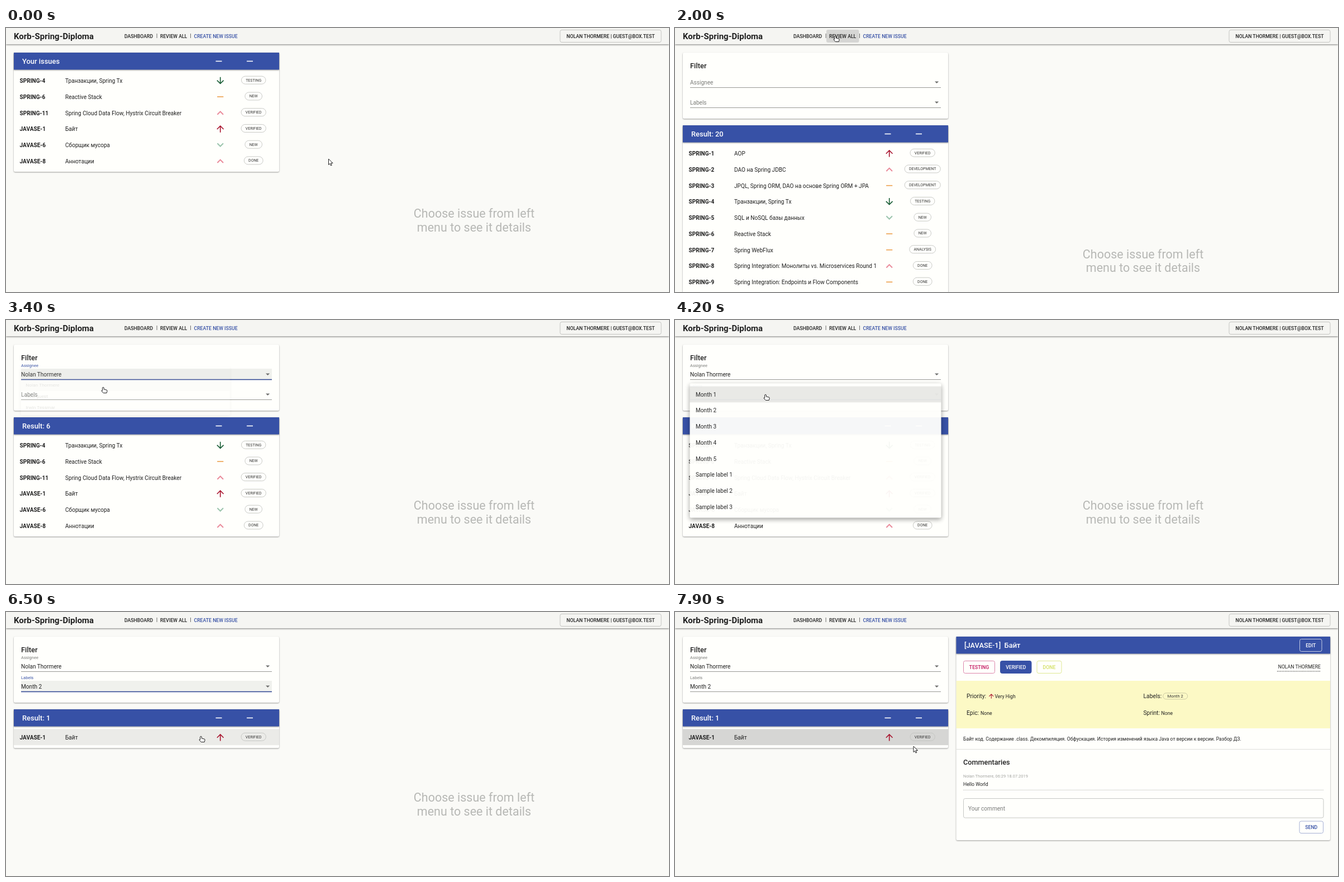
An HTML page that plays this animation: 1187x472 px, repeating every 8000 ms.

```html
<!DOCTYPE html>
<html lang="en">
<head>
<meta charset="utf-8">
<title>Issue tracker</title>
<style>
  html, body { margin: 0; width: 100%; height: 100%; overflow: hidden; background: #fafaf7; }
  svg { display: block; width: 1187px; height: 472px; font-family: Roboto, "Liberation Sans", sans-serif; white-space: pre; }
  .card { filter: drop-shadow(0 1px 1.3px rgba(0,0,0,.38)); }
  .menu { filter: drop-shadow(0 3px 4px rgba(0,0,0,.4)); }
</style>
</head>
<body>
<svg id="stage" viewBox="0 0 1187 472" xmlns="http://www.w3.org/2000/svg"></svg>
<script>
const LOOP = 8000;
const BLUE = '#3751a6', INK = '#212121', GRAY = '#7b7c7a', PAPER = '#fffffc', BG = '#fafaf7';
const USER = 'Nolan Thormere';
const ROW = 28.75, BODY = 10.1, SMALL = 8.7;
const stage = document.getElementById('stage');
const pen = document.createElement('canvas').getContext('2d');

// id, title, priority, status, belongs to the current user
const ISSUES = [
  ['SPRING-1', 'AOP', 'top', 'VERIFIED'],
  ['SPRING-2', 'DAO на Spring JDBC', 'high', 'DEVELOPMENT'],
  ['SPRING-3', 'JPQL, Spring ORM, DAO на основе Spring ORM + JPA', 'mid', 'DEVELOPMENT'],
  ['SPRING-4', 'Транзакции, Spring Tx', 'lowest', 'TESTING', 1],
  ['SPRING-5', 'SQL и NoSQL базы данных', 'low', 'NEW'],
  ['SPRING-6', 'Reactive Stack', 'mid', 'NEW', 1],
  ['SPRING-7', 'Spring WebFlux', 'mid', 'ANALYSIS'],
  ['SPRING-8', 'Spring Integration: Монолиты vs. Microservices Round 1', 'high', 'DONE'],
  ['SPRING-9', 'Spring Integration: Endpoints и Flow Components', 'mid', 'DONE'],
  ['SPRING-11', 'Spring Cloud Data Flow, Hystrix Circuit Breaker', 'high', 'VERIFIED', 1],
  ['JAVASE-1', 'Байт', 'top', 'VERIFIED', 1],
  ['JAVASE-6', 'Сборщик мусора', 'low', 'NEW', 1],
  ['JAVASE-8', 'Аннотации', 'high', 'DONE', 1]
];
const MINE = ISSUES.filter(issue => issue[4]);
const FOUND = MINE.filter(issue => issue[0] === 'JAVASE-1');

const MENUS = [
  { y: 97, items: ['', USER, 'New guest', 'Irwin Tessmar'], open: 2550, close: 3235, span: 266, picked: 0, pick: LOOP },
  { y: 133, items: [1, 2, 3, 4, 5].map(n => 'Month ' + n).concat([1, 2, 3].map(n => 'Sample label ' + n)),
    open: 3970, close: 5715, span: 311, picked: 1, pick: 4800 }
];

// time, x, y of the pointer's hot spot
const POINTER = [
  [0, 577.5, 234], [400, 577.5, 234], [900, 260, 42], [1050, 260, 42], [1500, 287, 14], [2050, 287, 14],
  [2500, 170, 97], [2950, 170, 97], [3180, 174, 120], [3420, 174, 120], [3800, 162, 133], [4220, 162, 133],
  [4500, 162, 157], [5250, 162, 157], [5600, 538, 197], [6050, 538, 197], [6480, 349, 222], [6580, 349, 222],
  [6800, 312, 222], [7650, 312, 222], [7900, 427, 240], [LOOP, 427, 240]
];

const clamp = v => Math.max(0, Math.min(1, v));
const mix = (a, b, p) => a + (b - a) * p;
const smooth = p => p * p * (3 - 2 * p);

// cubic-bezier(.4, 0, .2, 1)
function standardEase(p) {
  p = clamp(p);
  let lo = 0, hi = 1, s = p;
  for (let i = 0; i < 18; i++) {
    s = (lo + hi) / 2;
    const x = 3 * s * (1 - s) * (.4 * (1 - s) + .2 * s) + s ** 3;
    if (x < p) lo = s; else hi = s;
  }
  return 3 * (1 - s) * s * s + s ** 3;
}

function text(x, middle, str, size = BODY, fill = INK, weight = 400, anchor = 'start') {
  return `<text x="${x}" y="${middle + size * .355}" font-size="${size}" fill="${fill}" font-weight="${weight}" text-anchor="${anchor}">${str}</text>`;
}
function rect(x, y, w, h, fill, extra = '') {
  return `<rect x="${x}" y="${y}" width="${w}" height="${h}" fill="${fill}" ${extra}/>`;
}
const card = (x, y, w, h) => rect(x, y, w, h, PAPER, 'rx="2.5" class="card"');
const line = (x1, x2, y, color, width = 1, dash = '') =>
  `<path d="M${x1} ${y}H${x2}" stroke="${color}" stroke-width="${width}" stroke-dasharray="${dash}"/>`;

function button(x, y, w, h, label, color, border = color, fill = 'none') {
  return rect(x + .5, y + .5, w - 1, h - 1, fill, `rx="3" stroke="${border}"`) +
    text(x + w / 2, y + h / 2, label, SMALL, color, 500, 'middle');
}
function chip(cx, cy, label, size = 6.95, h = 14, border = '#c3c4c1') {
  pen.font = `${size}px Roboto, "Liberation Sans", sans-serif`;
  const w = pen.measureText(label).width + 15.6;
  return rect(cx - w / 2, cy - h / 2, w, h, 'none', `rx="${h / 2}" stroke="${border}" stroke-width=".9"`) +
    text(cx, cy, label, size, '#333', 400, 'middle');
}

const ARROW = 'M-6.4 0l1.13 1.13L-.8-3.34V6.4H.8V-3.34l4.47 4.47L6.4 0 0-6.4z';
const CHEVRON = 'M0-3.7l-6 6 1.41 1.41L0-.87l4.59 4.58L6 2.3z';
const DASH = 'M-5.6-.8H5.6V.8H-5.6z';
const PRIORITY = {
  top: [ARROW, '#a8122c', 1], high: [CHEVRON, '#ea8b9a', 1], mid: [DASH, '#eda04c', 1],
  low: [CHEVRON, '#9cc5ad', -1], lowest: [ARROW, '#175c33', -1]
};
function icon(x, y, kind, scale = 1) {
  const [d, fill, flip] = PRIORITY[kind];
  return `<path d="${d}" fill="${fill}" transform="translate(${x} ${y}) scale(${scale} ${scale * flip})"/>`;
}

function pointerAt(t) {
  const i = POINTER.findIndex(key => key[0] > t);
  const [t0, x0, y0] = POINTER[i - 1], [t1, x1, y1] = POINTER[i];
  const p = smooth((t - t0) / (t1 - t0));
  return { x: mix(x0, x1, p), y: mix(y0, y1, p) };
}
function drawPointer({ x, y }, hand) {
  const d = hand
    ? 'M-1.3 1Q0-.9 1.3 1V4L6 5Q7.4 5.4 7.1 7L6.2 10.5H.3L-3 6.8Q-3.2 5.3-1.3 6.2Z'
    : 'M0 0V10.5L2.4 8.3 4 12 5.8 11.2 4.2 7.6H7.6Z';
  return `<path d="${d}" transform="translate(${x} ${y})" fill="#fff" stroke="#222" stroke-linejoin="round"/>`;
}
const inside = (p, x, y, w, h) => p.x >= x && p.x < x + w && p.y >= y && p.y < y + h;

function topBar(t, pointer) {
  let out = rect(0, 0, 1187, 29, '#f5f5f2', 'style="filter:drop-shadow(0 1px 1.5px rgba(0,0,0,.5))"');
  if (inside(pointer, 271, 3, 58, 23))
    out += rect(271, 3, 58.5, 23, '#000', `rx="3" opacity="${mix(.07, .125, clamp((t - 1700) / 200))}"`);
  return out + text(14, 14.5, 'Korb-Spring-Diploma', 15, INK, 700) +
    text(212, 14.5, 'DASHBOARD', SMALL, INK, 500) + text(269, 14, '|', SMALL) +
    text(276, 14.5, 'REVIEW ALL', SMALL, INK, 500) + text(329.5, 14, '|', SMALL) +
    text(336.5, 14.5, 'CREATE NEW ISSUE', SMALL, BLUE, 500) +
    button(991.5, 3, 182, 23, USER.toUpperCase() + ' | GUEST@BOX.TEST', INK, '#c4c5c2');
}

function field(y, label, value, focused, shrink) {
  let out = focused ? rect(27, y - 10, 449, 19.5, '#f0f1ed') : '';
  out += line(27, 476, y + 9.5, focused ? '#2b4290' : '#8d8e8b', focused ? 1.5 : .9);
  out += text(27, y - 15.8 * shrink, label, mix(BODY, 7.56, shrink), focused ? BLUE : GRAY);
  return out + text(27, y, value) + `<path d="M465 ${y - 1.5}h7.2l-3.6 3.6z" fill="#6f706e"/>`;
}

function filterCard(t) {
  const shrunk = menu => standardEase((t - menu.open) / 200);
  return card(14, 44, 475, 118) + text(27, 67.2, 'Filter', 12.9, INK, 500) +
    field(97, 'Assignee', t < 3230 ? '' : USER, t >= 2550 && t < 3960, shrunk(MENUS[0])) +
    field(133, 'Labels', t < 4900 ? '' : 'Month 2', t >= 3960 && t < 6880, shrunk(MENUS[1]));
}

function issueList(t, top, title, issues, count, pointer) {
  let out = card(14, top, 475, 36 + ROW * count + 4.5);
  issues.forEach(([id, name, kind, status], i) => {
    const y = top + 50.5 + ROW * i, rowTop = y - 15.2;
    const chosen = t >= 7300;
    const hovered = pointer && inside(pointer, 14, rowTop, 475, ROW);
    if (chosen || hovered) out += rect(14, rowTop, 475, ROW, '#000', `opacity="${chosen ? .16 : .08}"`);
    if (t >= 6880 && t < 7300) {
      const p = standardEase((t - 6880) / 400);
      out += `<clipPath id="row">${rect(14, rowTop, 475, ROW)}</clipPath>` +
        `<circle cx="312" cy="222" r="${300 * p}" opacity=".08" clip-path="url(#row)"/>`;
    }
    out += text(24.5, y, id, BODY, INK, 700) + text(106, y, name) + icon(383.7, y - .3, kind) + chip(443.2, y - 1.3, status);
  });
  return out + rect(14, top, 475, 30.5, BLUE, 'class="card"') + text(29, top + 15.6, title, 12.9, '#fff', 500) +
    line(375.5, 386.5, top + 15.4, '#fff', 1.6) + line(431, 442, top + 15.4, '#fff', 1.6);
}

function menuBox(menu) {
  return [26.5, menu.y - 19.8, 450, menu.items.length * ROW + 10.4];
}
function drawMenu(menu, t, pointer) {
  const closing = t >= menu.close;
  const age = (t - (closing ? menu.close : menu.open)) / menu.span;
  const fade = standardEase(age);
  const grow = standardEase(closing ? (age - .333) / .666 : age / .666);
  const shown = closing ? 1 - fade : fade;
  const s = closing ? mix(1, .75, grow) : mix(.75, 1, grow);
  const [x, y, w, h] = menuBox(menu);
  let out = rect(x, y, w, h, PAPER, 'rx="2.5" class="menu"');
  menu.items.forEach((item, i) => {
    const cy = menu.y + ROW * i, rowTop = cy - ROW / 2;
    const hovered = inside(pointer, x, rowTop, w, ROW);
    const selected = i === menu.picked && (menu.picked === 0 || t >= menu.pick);
    const shade = selected ? .13 : hovered ? .085 : 0;
    if (shade) out += rect(x, rowTop, w, ROW, '#000', `opacity="${shade}"`);
    out += text(37, cy, item);
  });
  return `<g opacity="${shown}" transform="translate(${x} ${menu.y}) scale(${s} ${s * s}) translate(${-x} ${-menu.y})">${out}</g>`;
}

function hint(y) {
  return text(838, y, 'Choose issue from left', 21.5, '#b7b8b5', 400, 'middle') +
    text(838, y + 24.5, 'menu to see it details', 21.5, '#b7b8b5', 400, 'middle');
}

function details() {
  const about = 'Байт код. Содержание .class. Декомпиляция. Обфускация. История изменений языка Java от версии к версии. Разбор ДЗ.';
  return card(503.5, 44, 669.5, 364) + rect(503.5, 44, 669.5, 30.5, BLUE, 'class="card"') +
    text(518, 59.5, '[JAVASE-1]&#160; Байт', 12.9, '#fff', 500) +
    button(1118, 48, 40.5, 23, 'EDIT', '#fff', '#c3cbe4') +
    button(516, 87, 57, 23, 'TESTING', '#c4145f', '#dd86ab') +
    button(582, 87, 56.5, 23, 'VERIFIED', '#fff', BLUE, BLUE) +
    button(647.5, 87, 45, 23, 'DONE', '#d2df62', '#dfe893') +
    text(1156, 98.3, USER.toUpperCase(), SMALL, INK, 400, 'end') + line(1078, 1156, 106, INK, 1.2, '1.4 1.4') +
    rect(503.5, 123, 669.5, 85, '#fcf9c5') +
    text(522, 150.3, 'Priority:', 10.3) + icon(566.3, 150.5, 'top', .67) + text(572.5, 150.7, 'Very High', SMALL) +
    text(838.5, 150.3, 'Labels:', 10.3) + chip(895.7, 150.4, 'Month 2', 7.7, 11, '#c5c39f') +
    text(522, 180.3, 'Epic:', 10.3) + text(547, 180.7, 'None', SMALL) +
    text(838.5, 180.3, 'Sprint:', 10.3) + text(870.5, 180.7, 'None', SMALL) +
    text(516, 226.7, about, 8.64) + line(503.5, 1173, 245.5, '#dededb') +
    text(516, 268.7, 'Commentaries', 12.7, INK, 500) +
    text(516, 293, USER + ', 06:29 18.07.2019', 7.56, '#a3a4a1') + text(516, 308, 'Hello World', SMALL) +
    line(516, 1161, 318.3, '#aaaba8', .9, '1 1') +
    rect(516.5, 333.5, 644.5, 34.5, 'none', 'rx="3" stroke="#c6c7c4"') + text(525, 351, 'Your comment', BODY, GRAY) +
    button(1117.5, 373.5, 43.5, 22.5, 'SEND', BLUE, '#a5b0d5');
}

function scene(t) {
  const pointer = pointerAt(t);
  const menu = MENUS.find(m => t >= m.open && t < m.close + m.span);
  const modal = menu && t < menu.close;
  const rowPointer = modal ? null : pointer;
  const reviewing = t >= 1780;
  let issues = MINE, count = MINE.length, top = 44, title = 'Your issues';
  if (reviewing) {
    top = 174;
    if (t < 3280) { issues = ISSUES.slice(0, 9); count = 20; }
    else if (t >= 4900) { issues = FOUND; count = 1; }
    title = 'Result: ' + count;
  }
  const rowsTop = top + 35;
  const hand = modal ? inside(pointer, ...menuBox(menu))
    : inside(pointer, 14, rowsTop, 475, ROW * count) || inside(pointer, 271, 3, 58, 23) ||
      reviewing && inside(pointer, 27, 87, 449, 56);
  return rect(0, 0, 1187, 472, BG) + (reviewing ? filterCard(t) : '') +
    issueList(t, top, title, issues, count, rowPointer) +
    (t >= 7050 ? details() : hint(count === 20 ? 404 : 331.7)) +
    topBar(t, pointer) + (menu ? drawMenu(menu, t, pointer) : '') + drawPointer(pointer, hand);
}

let start, last;
function frame(now) {
  start ??= now;
  const markup = scene((now - start) % LOOP);
  if (markup !== last) stage.innerHTML = last = markup;
  requestAnimationFrame(frame);
}
requestAnimationFrame(frame);
</script>
</body>
</html>
```
